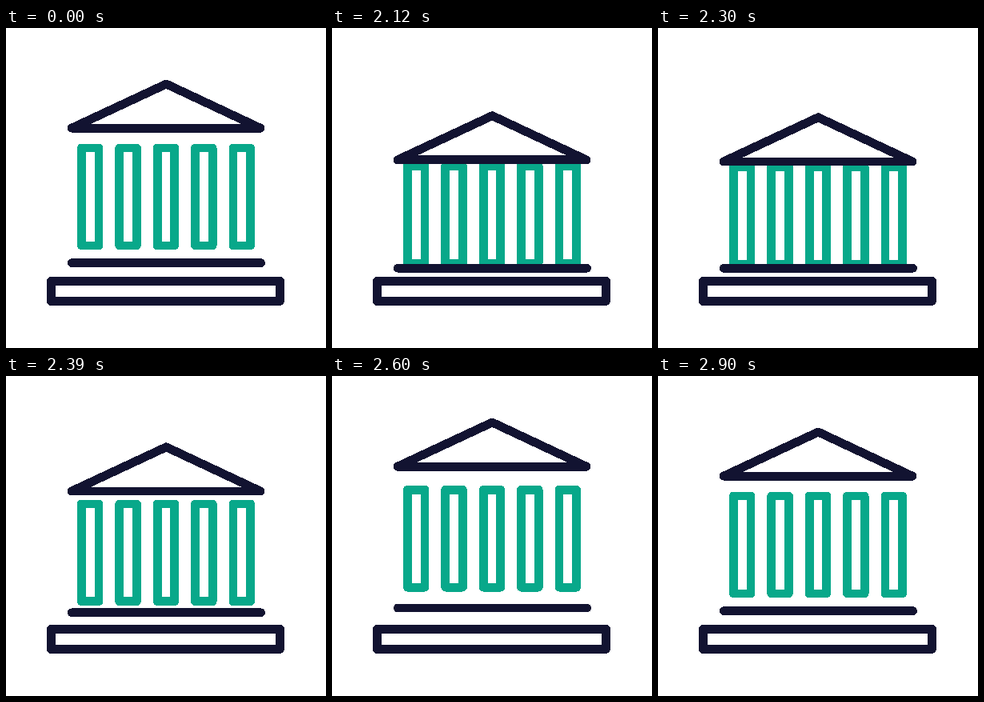
Write an HTML page that moves like this. It is 400 by 400 pixels and loops after 2960 ms.

```html
<!DOCTYPE html>
<html lang="en">
<head>
<meta charset="utf-8">
<title>Bank building</title>
<style>
  html, body { margin: 0; width: 100%; height: 100%; overflow: hidden; background: #fff; }
  svg { display: block; width: 100%; height: 100%; shape-rendering: crispEdges; }
  g { fill: none; stroke: #121331; stroke-width: 10.8; stroke-linecap: round; stroke-linejoin: round; }
  #columns { stroke: #08a88a; }
</style>
</head>
<body>
<svg viewBox="0 0 400 400">
  <g id="columns"></g>
  <g id="roof"><path d="M82 125.2 200.3 70 318 125.2Z"/></g>
  <g id="step"><path d="M82.3 293.6H318.5"/></g>
  <g><rect x="56.5" y="316.5" width="286" height="25"/></g>
</svg>
<script>
  const LOOP = 2960, START = 2000, FRAME = 30;
  const LOW = 2210, HIGH = 2565, END = 2900;

  // Vertical travel of each part: lowest and highest offset from rest
  const parts = [
    { id: 'roof', low: 51.3, high: -12.3 },
    { id: 'columns', low: 28.6, high: -8 },
    { id: 'step', low: 8.5, high: -3.7 }
  ].map(p => ({ ...p, el: document.getElementById(p.id) }));

  const columns = document.getElementById('columns');
  for (let i = 0; i < 5; i++) {
    const rect = document.createElementNS('http://www.w3.org/2000/svg', 'rect');
    const box = { x: 94.3 + i * 47.4, y: 150, width: 21.7, height: 121.9 };
    for (const key in box) rect.setAttribute(key, box[key]);
    columns.append(rect);
  }

  const mix = (a, b, k) => a + (b - a) * k;
  const easeInOut = u => (1 - Math.cos(Math.PI * u)) / 2;

  function bezier(u, x1, y1, x2, y2) {
    const at = (s, a, b) => 3 * a * s * (1 - s) ** 2 + 3 * b * s * s * (1 - s) + s ** 3;
    let lo = 0, hi = 1;
    for (let i = 0; i < 20; i++) {
      const mid = (lo + hi) / 2;
      if (at(mid, x1, x2) < u) lo = mid; else hi = mid;
    }
    return at(lo, y1, y2);
  }

  function offset({ low, high }, t) {
    if (t <= START || t >= END) return 0;
    if (t < LOW) return low * bezier((t - START) / (LOW - START), 0.3, 0.4, 0.6, 1);
    if (t < HIGH) return mix(low, high, easeInOut((t - LOW) / (HIGH - LOW)));
    return mix(high, 0, easeInOut((t - HIGH) / (END - HIGH)));
  }

  function draw(now) {
    const time = now % LOOP;
    const t = START + Math.floor((time - START) / FRAME) * FRAME;
    for (const p of parts) p.el.setAttribute('transform', `translate(0 ${offset(p, t).toFixed(2)})`);
  }

  const begin = performance.now();
  function tick() {
    draw(performance.now() - begin);
    requestAnimationFrame(tick);
  }
  tick();
</script>
</body>
</html>
```
